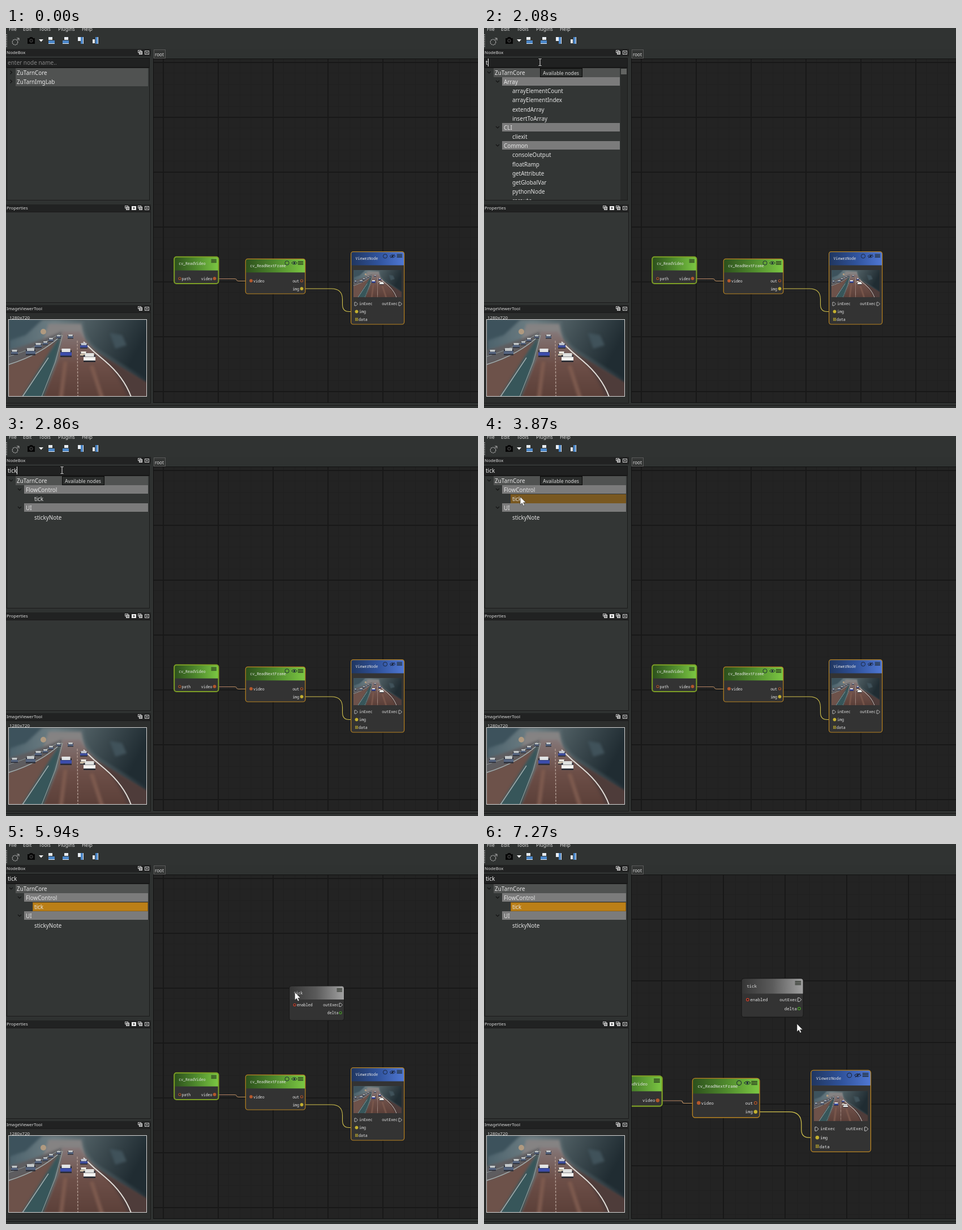
An HTML page with a canvas for the animation above (8000 ms loop, 834x672 px).

```html
<!DOCTYPE html>
<html lang="en">
<head>
<meta charset="utf-8">
<title>Node editor</title>
<style>
html, body { margin: 0; width: 100%; height: 100%; overflow: hidden; background: #2f3231; }
canvas { display: block; width: 834px; height: 672px; }
</style>
</head>
<body>
<canvas id="stage" width="834" height="672"></canvas>
<script>
const stage = document.getElementById('stage').getContext('2d');
let ctx = stage;
const SANS = '"Noto Sans", "Open Sans", sans-serif';
const MONO = '"Noto Sans Mono", "DejaVu Sans Mono", monospace';
const ORIGIN = { x: 860, y: 352 }, ANCHOR = { x: 867, y: 359 };
const YELLOW = '#c4b030', RED = '#b4582c', AMBER = '#b98422', LIGHT = '#dcdcdc';

// ---------- drawing helpers ----------
function rect(x, y, w, h, fill) {
  ctx.fillStyle = fill;
  ctx.fillRect(x, y, w, h);
}
function frame(x, y, w, h, color) {
  ctx.strokeStyle = color;
  ctx.lineWidth = 1;
  ctx.strokeRect(x + .5, y + .5, w - 1, h - 1);
}
function text(s, x, y, size, color = LIGHT, align = 'left', family = SANS) {
  ctx.font = `${size}px ${family}`;
  ctx.textAlign = align;
  ctx.fillStyle = color;
  ctx.fillText(s, x, y);
}
const mono = (s, x, y, align) => text(s, x, y, 6.6, '#e4e4e4', align, MONO);
function shape(d, fill, stroke, width = 1) {
  const p = new Path2D(d);
  if (fill) { ctx.fillStyle = fill; ctx.fill(p); }
  if (stroke) { ctx.strokeStyle = stroke; ctx.lineWidth = width; ctx.stroke(p); }
}
function dot(x, y, r, fill, stroke, width = 1) {
  ctx.beginPath();
  ctx.arc(x, y, r, 0, 7);
  if (fill) { ctx.fillStyle = fill; ctx.fill(); }
  if (stroke) { ctx.strokeStyle = stroke; ctx.lineWidth = width; ctx.stroke(); }
}
function gradient(x0, y0, x1, y1, ...colors) {
  const g = ctx.createLinearGradient(x0, y0, x1, y1);
  colors.forEach((c, i) => g.addColorStop(i / (colors.length - 1), c));
  return g;
}
function clipped(x, y, w, h, draw) {
  ctx.save();
  ctx.beginPath();
  ctx.rect(x, y, w, h);
  ctx.clip();
  draw();
  ctx.restore();
}

// ---------- timeline ----------
const lerp = (a, b, k) => a + (b - a) * k;
const ease = k => k * k * (3 - 2 * k);
const stepAt = (t, t0, t1, n) => Math.min(n - 1, Math.floor((t - t0) / (t1 - t0) * (n - 1) + 1e-6));
const between = (t, a, b) => t >= a && t < b;
const along = (a, b, k) => ({ x: lerp(a[0], b[0], k), y: lerp(a[1], b[1], k) });

const DRAG = [[66, 116], [140, 146], [262, 190], [405, 230], [500, 253], [525, 257], [508, 251]];

function pointer(t) {
  if (t < 150) return null;
  if (t < 3720) return along([643, 541], [99, 60], ease(stepAt(t, 150, 920, 11) / 10));
  if (t < 4480) return along([99, 60], [60, 113], Math.min(1, ease((stepAt(t, 3720, 4020, 5) + 2) / 5)));
  if (t < 5330) { const p = DRAG[stepAt(t, 4480, 4950, 7)]; return { x: p[0], y: p[1] }; }
  if (t < 5790) return along([508, 251], [500, 251], t < 5410 ? .5 : 1);
  if (t < 6420) return along([500, 251], [552, 307], ease((stepAt(t, 5790, 6250, 7) + 1) / 7));
  if (t < 7200) return along([552, 307], [553, 311], Math.min(1, (stepAt(t, 6420, 6720, 5) + 1) / 3));
  return { x: 553, y: t < 7270 ? 315 : 318 };
}
const typed = t => 'tick'.slice(0, [2080, 2480, 2630, 2860].filter(k => t >= k).length);
const caretOn = t => between(t, 1070, 1620) || between(t, 2080, 3410) || between(t, 3940, 4480);
const zoomAt = t => t < 6650 ? 1 : t < 6720 ? 1.0617 : 1.1237;

// ---------- road picture, in units of 243 x 137 ----------
function car(x, y, w, body, roof) {
  rect(x, y + w * .15, w, w * .6, '#2a2c35');
  rect(x + w * .12, y, w * .76, w * .3, roof);
  rect(x, y + w * .32, w, w * .3, body);
}
function paintRoad() {
  const canvas = document.createElement('canvas');
  canvas.width = 243;
  canvas.height = 137;
  ctx = canvas.getContext('2d');
  ctx.filter = 'blur(2px)';
  rect(0, 0, 243, 137, gradient(0, 0, 243, 0, '#4c626c', '#6f7f84', '#48575c', '#26333a'));
  shape('M0 0H60L30 28L0 38Z', '#3d525c');
  shape('M70 8H128L135 40H60Z', '#858383');
  shape('M135 -5Q128 30 160 54L250 110V-5Z', gradient(140, 0, 230, 50, '#4d5c61', '#202c32'));
  shape('M178 24l22 4l8 18l-20 6z', '#40525a');
  shape('M0 55Q50 40 94 22L86 58L35 140H-5Z', '#5e5d60');
  shape('M-5 82Q45 66 84 36L66 72L22 140H-5Z', '#6d524a');
  shape('M94 26L82 75L62 140H22L66 68Z', '#37565a');
  shape('M95 22H126Q140 48 170 70L250 118V140H60L86 72Z', gradient(0, 20, 0, 137, '#86797a', '#6d4f48', '#5c4039'));
  shape('M145 54Q190 82 210 140H250V116L165 65Z', '#4e3c3a');
  shape('M100 75L92 140M146 82L165 140', null, '#7d5a4e', 7);
  ctx.filter = 'blur(.6px)';
  shape('M0 80Q58 62 93 28M24 137L70 68', null, '#a3b0b1', 1.4);
  shape('M0 66Q50 50 90 26', null, '#8b9596', 1);
  shape('M95 28L82 76L58 137', null, '#9ba7a5', 1);
  shape('M132 40Q150 58 170 74Q203 102 216 137', null, '#e2dfda', 2);
  ctx.setLineDash([4, 2]);
  shape('M121 38L122 137', null, '#b39e95', 1.3);
  ctx.setLineDash([]);
  dot(61, 22, 5, '#b09a80');
  [[4, 54, 12], [30, 51, 17], [46, 42, 12], [60, 39, 9], [70, 33, 9], [84, 28, 8], [104, 27, 10]]
    .forEach(([x, y, w]) => car(x, y, w, '#55647f', '#c3c8ca'));
  car(126, 42, 13, '#3e4d9c', '#c0c5d0');
  car(126, 57, 12, '#cdbfa9', '#efece4');
  car(91, 52, 20, '#3c4dab', '#e1e3e4');
  car(132, 60, 21, '#f4f4f0', '#e0e2e0');
  ctx = stage;
  return canvas;
}
const ROAD = paintRoad();

// ---------- side panels ----------
function chevron(x, y, open) {
  shape(open ? `M${x - 3} ${y - 1.5}l3 3l3 -3` : `M${x - 1.5} ${y - 3}l3 3l-3 3`, null, '#141414', 1.2);
}
function floatIcon(x, y) {
  frame(x - 4, y - 4, 6, 5, '#c0c0c0');
  rect(x - 2, y - 2, 6, 6, '#8d8d8d');
  frame(x - 2, y - 2, 6, 6, '#d0d0d0');
}
function titleBar(title, y, extra) {
  rect(0, y - 6, 256, 13, '#212222');
  text(title, 1, y + 3.3, 7.75);
  floatIcon(237, y);
  frame(245, y - 3, 8, 7, '#c8c8c8');
  shape(`M247.5 ${y - 1}l3 3m0 -3l-3 3`, null, '#d8d8d8');
  if (extra) {
    floatIcon(214, y);
    rect(222, y - 3, 8, 7, '#ededed');
    shape(`M225 ${y - 1.5}l3 2l-3 2z`, '#333');
  }
}
function toolbar() {
  rect(0, 0, 834, 37, '#303332');
  [['File', 5], ['Edit', 30], ['Tools', 58], ['Plugins', 92], ['Help', 134]]
    .forEach(([s, x]) => text(s, x, 5, 8.6));
  for (let y = 11; y < 34; y += 3) rect(0, y, 2, 1.5, '#9a9a9a');
  ctx.setLineDash([2, 1]);
  dot(16, 25, 4.8, null, '#b0b0b0', 1.2);
  ctx.setLineDash([]);
  shape('M19 18h4v4m0 -4l-4 4', null, '#b0b0b0', 1);
  shape('M38 18h3l1.5 -2h4l1.5 2h3v10h-13z', '#060606');
  dot(44.5, 22.5, 2.7, '#111', '#555');
  shape('M58 20h8l-4 4.5z', '#eee');
  const white = '#e8eef4', blue = '#4a86c8';
  rect(75, 16, 7, 5, white); rect(75, 22, 11, 5, blue); rect(75, 27, 11, 1, white);
  rect(103, 16, 7, 5, white); rect(100, 22, 11, 5, blue); rect(100, 27, 11, 1, white);
  rect(127, 16, 5, 7, white); rect(132, 16, 4, 12, blue); rect(136, 16, 1, 12, white);
  rect(153, 20, 4, 7, white); rect(158, 16, 4, 12, blue); rect(162, 16, 1, 12, white);
}

// A leading '#' marks a category, '*' a package; other rows are nodes.
const PACKAGES = ['ZuTarnCore', 'ZuTarnImgLab'];
const LISTS = [
  PACKAGES,
  ['*ZuTarnCore', '#Array', 'arrayElementCount', 'arrayElementIndex', 'extendArray', 'insertToArray',
    '#CLI', 'cliexit', '#Common', 'consoleOutput', 'floatRamp', 'getAttribute', 'getGlobalVar', 'pythonNode', 'reroute'],
  ['*ZuTarnCore', '#Common', 'getAttribute', 'setAttribute', '#FlowControl', 'tick', 'timer',
    '#Math', 'multiply', 'repetition', '#UI', 'stickyNote', '*ZuTarnImgLab', '#Filters', 'bilateral'],
  ['*ZuTarnCore', '#FlowControl', 'tick', '#Math', 'arithmeticAdd', 'arithmeticSub', '#UI', 'stickyNote',
    '*ZuTarnImgLab', '#Filters', 'opticalFlow', '#Geometry', 'verticalFlip', 'verticalLine', 'vertices'],
  ['*ZuTarnCore', '#FlowControl', 'tick', '#UI', 'stickyNote'],
];
const ROW = 16.15;

function tree(t, mouse) {
  const list = LISTS[typed(t).length], long = list.length > 10, right = long ? 240 : 251;
  const hover = mouse && mouse.x < 251 && mouse.y > 71 ? Math.floor((mouse.y - 71) / ROW) : -1;
  rect(1, 70, 253, 235, '#1b1b1b');
  rect(2, 71, 251, 233, '#333635');
  clipped(2, 71, 251, 233, () => list.forEach((item, i) => {
    const y = Math.round(71 + i * ROW), name = item.replace(/^[*#]/, '');
    const pack = item[0] === '*' || list === PACKAGES, group = item[0] === '#';
    const x = pack ? 17 : group ? 32 : 47;
    const picked = name === 'tick' && t >= 4480;
    const over = i === hover && t < 4480;
    const fill = picked ? '#bb7f17' : over ? '#795820' : pack ? '#505251' : group ? '#7b7b7b' : null;
    if (fill) rect(x, y, right - x, group ? 15 : 16, fill);
    if (picked) frame(x, y, right - x, 16, '#8f6419');
    if (pack || group) chevron(pack ? 9 : 24, y + 7.5, list !== PACKAGES);
    text(name, x + (pack ? 2 : 3), y + 12, 9.85, '#e6e6e6');
  }));
  if (long) {
    rect(241, 71, 12, 233, '#292b2a');
    rect(242, 72, 10, 10, '#626462');
  }
}
function leftDock(t, mouse) {
  titleBar('NodeBox', 43);
  rect(0, 53, 254, 17, '#161616');
  rect(1, 54, 252, 15, '#202121');
  const query = typed(t);
  text(query || 'enter node name..', 3, 65, 10, query ? '#f0f0f0' : '#858585');
  if (caretOn(t)) {
    ctx.font = `10px ${SANS}`;
    rect(Math.round(3 + ctx.measureText(query).width), 54, 1, 14, '#f0f0f0');
  }
  tree(t, mouse);

  titleBar('Properties', 318, true);
  rect(0, 325, 256, 161, '#1b1b1b');
  rect(0, 326, 255, 159, '#333635');

  titleBar('ImageViewerTool', 496);
  rect(0, 503, 256, 161, '#1b1b1b');
  rect(0, 504, 255, 159, '#2c2e2d');
  text('1280x720', 6, 515, 7.95);
  ctx.drawImage(ROAD, 5, 515, 243, 137);
  frame(4, 515, 245, 137, '#d5d5d5');

  if (between(t, 1930, 4480)) {
    rect(99, 71, 75, 16, '#2b2d2c');
    frame(99, 71, 75, 16, '#080808');
    text('Available nodes', 104, 82.5, 8.7);
  }
}

// ---------- graph ----------
const zoomed = (axis, zoom) => ANCHOR[axis] + (ORIGIN[axis] - ANCHOR[axis]) * zoom;

function grid(zoom) {
  const x0 = zoomed('x', zoom), y0 = zoomed('y', zoom);
  const lines = (gap, width, color) => {
    for (let x = x0 - Math.ceil(600 / gap) * gap; x < 834; x += gap) rect(Math.round(x) - 1, 55, width, 607, color);
    for (let y = y0 - Math.ceil(300 / gap) * gap; y < 662; y += gap) rect(261, Math.round(y) - 1, 573, width, color);
  };
  rect(261, 55, 573, 607, '#232323');
  lines(19.4 * zoom, 1, '#202020');
  lines(97 * zoom, 2, '#181818');
}
function bars(x, y) {
  for (let i = 0; i < 3; i++) rect(x, y + i * 2.4, 9.5, 1.7, '#1b2218b0');
}
function nodeBox(title, x, y, w, h, headColors, border, width = 1.2) {
  ctx.beginPath();
  ctx.roundRect(x, y, w, h, 4);
  ctx.save();
  ctx.clip();
  rect(x, y, w, h, '#333333');
  rect(x, y, w, 24, gradient(x, 0, x + w, 0, ...headColors));
  ctx.restore();
  ctx.strokeStyle = border;
  ctx.lineWidth = width;
  ctx.stroke();
  mono(title, x + 8, y + 14.7);
  bars(x + w - 13, y + 4);
}
function pin(x, y, color, hollow) {
  dot(x, y, hollow ? 2 : 2.7, hollow ? '#222' : color, color, hollow ? 1.1 : .5);
}
function execPin(x, y) {
  shape(`M${x} ${y - 3}h2.5l3 3l-3 3h-2.5z`, null, '#d8d8d8', .8);
}
function headIcons(x, y, crossed) {
  dot(x, y, 3.6, null, '#182236', .9);
  shape(`M${x + 8} ${y}q5 -5 10 0q-5 5 -10 0z`, null, '#182236', .9);
  dot(x + 13, y, 1.5, '#182236');
  if (crossed) shape(`M${x + 9} ${y + 3}l8 -6`, null, '#182236', .9);
}
function tickNode(x, y, ghost) {
  ctx.save();
  if (ghost) {
    ctx.globalAlpha = .75;
    nodeBox('tick', x, y, 98, 61, ['#202020', '#242424', '#303030'], '#181818', 1);
  } else {
    nodeBox('tick', x, y, 97, 61, ['#353535', '#5b5b5b', '#a2a2a2'], '#191919', 1);
  }
  ctx.globalAlpha = 1;
  pin(x + 9.5, y + 33.5, '#d1402c', !ghost);
  mono('enabled', x + 13.5, y + 36);
  mono('outExec', x + 87.5, y + 36, 'right');
  execPin(x + 88.5, y + 33.5);
  mono('delta', x + 87, y + 50, 'right');
  pin(x + 90.5, y + 47.5, '#4ba52c', true);
  ctx.restore();
}
function graph(t, mouse) {
  const zoom = zoomAt(t), green = ['#2c4f1c', '#4f8a2d', '#7cc843'];
  grid(zoom);
  ctx.save();
  ctx.translate(ANCHOR.x, ANCHOR.y);
  ctx.scale(zoom, zoom);
  ctx.translate(-ANCHOR.x, -ANCHOR.y);

  shape('M371 443.5H404Q407.5 443.5 407.5 445.5T411 447.5H430', null, gradient(371, 0, 430, 0, '#b07865', '#c79e62'), 1);
  shape('M525 461H575Q594.5 461 594.5 480V489Q594.5 501.5 606 501.5H617', null, '#d3c44d', 1.1);

  nodeBox('cv_ReadVideo', 297.2, 404.7, 78.3, 47.3, green, '#7d9f25', 2);
  pin(307, 443, RED, true);
  mono('path', 310.5, 445.5);
  mono('video', 364.5, 445.5, 'right');
  pin(368.5, 443, RED);

  nodeBox('cv_ReadNextFrame', 423.3, 408.3, 105.5, 61.7, green, AMBER);
  headIcons(496.5, 415.5);
  pin(433, 447, RED);
  mono('video', 437, 449.5);
  mono('out', 518, 449.5, 'right');
  pin(522.5, 447, RED, true);
  mono('img', 518, 463.5, 'right');
  pin(522.5, 461, YELLOW);

  nodeBox('ViewerNode', 609.6, 395.6, 94, 128.4, ['#20365f', '#2f529b', '#5078d4'], AMBER);
  headIcons(670, 403.5, true);
  ctx.drawImage(ROAD, 614, 428, 85, 47.5);
  execPin(616, 488);
  mono('inExec', 624, 490);
  mono('outExec', 692, 490, 'right');
  execPin(694, 488);
  pin(619.5, 501.5, YELLOW);
  mono('img', 624, 504);
  rect(617, 512.7, 5, 5, YELLOW);
  shape('M618.7 512.7v5m1.7 -5v5m-3.4 -3.4h5m-5 1.7h5', null, '#333', .5);
  mono('data', 623, 518);

  if (t >= 5790) tickNode(500.5, 251, false);
  ctx.restore();
  if (between(t, 4480, 5790) && mouse.x > 261) tickNode(mouse.x, mouse.y, true);
}

// ---------- pointer ----------
function drawPointer(t, { x, y }) {
  const pressed = between(t, 990, 1150) || between(t, 4480, 5790);
  if (pressed) dot(x - .5, y - .5, 9.3, '#a39a12d8');
  if (x < 254 && between(y, 53, 70)) {
    shape(`M${x - 2.5} ${y - 5.5}h2l.5 .5l.5 -.5h2m-2.5 .5v11m-2.5 .5h2l.5 -.5l.5 .5h2`, null, '#e8e8e8', 1);
    return;
  }
  shape(`M${x} ${y}v14l3.2 -3l2.4 5l2.2 -1l-2.3 -4.8h4.5z`, '#fff', '#222', .6);
  if (between(t, 4480, 5790) && x > 261) {
    rect(x + 8, y + 14, 6, 6, '#f2f2f2');
    rect(x + 10.5, y + 15, 1, 4, '#222');
    rect(x + 9, y + 16.5, 4, 1, '#222');
  }
}

function draw() {
  const t = performance.now() % 8000, mouse = pointer(t);
  rect(0, 0, 834, 672, '#2f3231');
  toolbar();
  leftDock(t, mouse);
  rect(261, 38, 21, 16, '#333534');
  frame(261, 38, 21, 16, '#5a5a5a');
  text('root', 263, 49.5, 8.1);
  rect(260, 54, 574, 609, '#111');
  clipped(261, 55, 573, 607, () => graph(t, mouse));
  rect(0, 664, 834, 8, '#303231');
  rect(0, 667, 834, 1, '#171717');
  if (mouse) drawPointer(t, mouse);
  requestAnimationFrame(draw);
}
draw();
</script>
</body>
</html>
```
